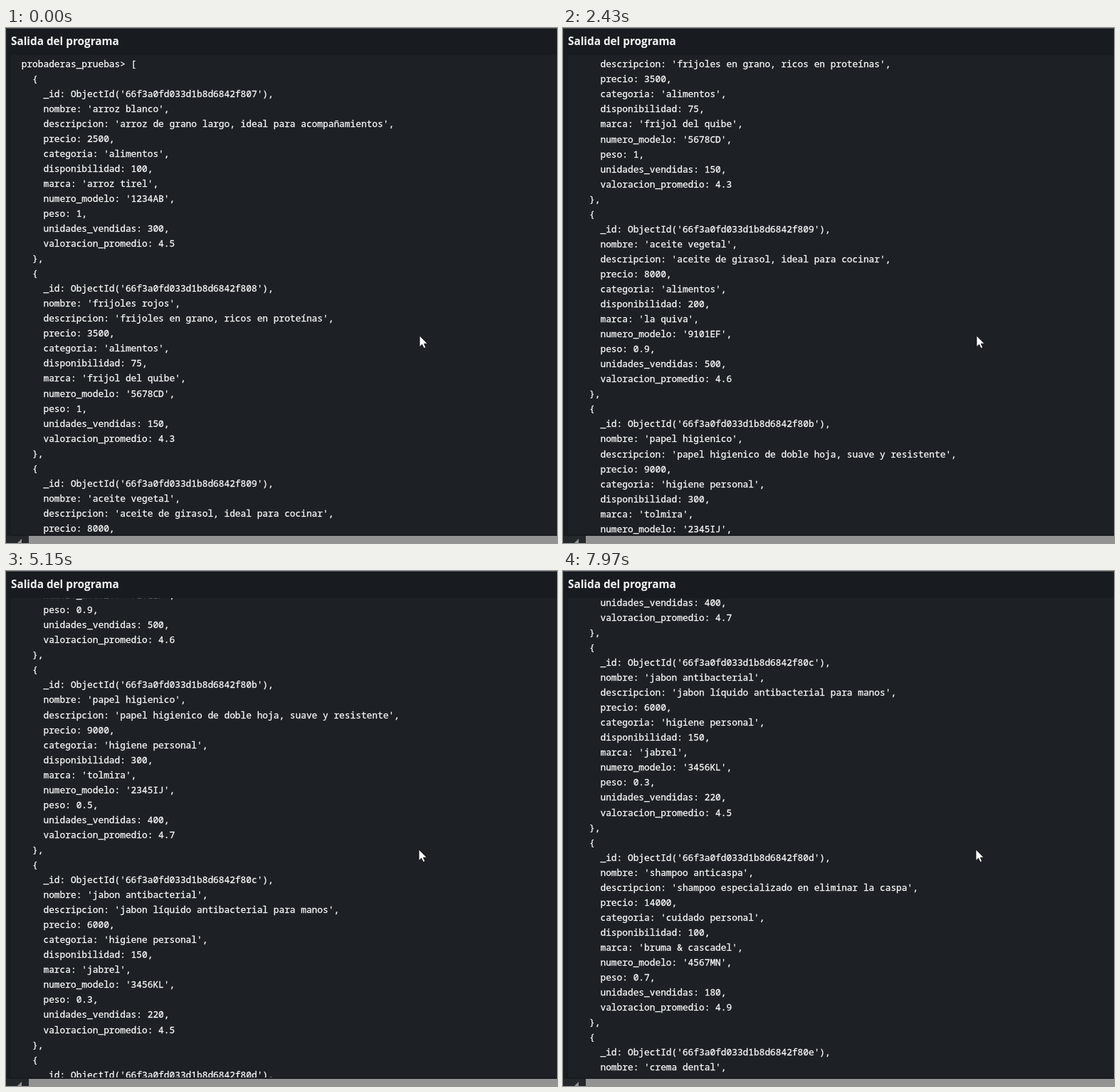
Recreate the animation shown at these times as an HTML page. Size 774x723 px, loop 8 s.

```html
<!DOCTYPE html>
<html lang="es">
<head>
<meta charset="utf-8">
<title>Salida del programa</title>
<style>
  html, body { margin: 0; width: 100%; height: 100%; overflow: hidden; background: #181c20; }
  #stage { position: relative; width: 774px; height: 723px; overflow: hidden; }
  #stage::before { content: ""; position: absolute; inset: 0; border-top: 1px solid #4a4e51; border-left: 1px solid #25292d; }
  h1 { position: absolute; left: 7px; top: 7px; margin: 0; color: #f4f4f4; white-space: nowrap;
       font: 700 15.3px/23px "Open Sans", "Noto Sans", sans-serif; }
  #view { position: absolute; left: 7px; top: 38px; width: 767px; height: 673px; overflow: hidden; background: #1d2125; }
  pre { position: absolute; left: 14.7px; top: 1.5px; margin: 0; color: #f8f8f8; -webkit-text-stroke: 0.3px #f8f8f8;
        font: 12.83px/21.05px "Noto Sans Mono", "DejaVu Sans Mono", monospace; font-variant-ligatures: none; }
  svg { position: absolute; left: 0; top: 0; }
</style>
</head>
<body>
<div id="stage">
  <h1>Salida del programa</h1>
  <div id="view"><pre id="out"></pre></div>
  <svg width="774" height="723">
    <rect y="713" width="32" height="10" fill="#25282b"/>
    <rect x="32" y="713" width="742" height="10" fill="#939393"/>
    <path d="M22 717V723H16Z" fill="#939393"/>
    <path id="cursor" d="M0 0V15.5L3.6 12.2L6 17.6L8.6 16.5L6.2 11.2H11Z" fill="#fff" stroke="#101214" stroke-width=".8"/>
  </svg>
</div>
<script>
const LOOP = 8000, STEP = 134, SLACK = 35;

const keys = ['nombre', 'descripcion', 'precio', 'categoria', 'disponibilidad', 'marca',
  'numero_modelo', 'peso', 'unidades_vendidas', 'valoracion_promedio'];
const items = {
  7: "'arroz blanco'|'arroz de grano largo, ideal para acompañamientos'|2500|'alimentos'|100|'arroz tirel'|'1234AB'|1|300|4.5",
  8: "'frijoles rojos'|'frijoles en grano, ricos en proteínas'|3500|'alimentos'|75|'frijol del quibe'|'5678CD'|1|150|4.3",
  9: "'aceite vegetal'|'aceite de girasol, ideal para cocinar'|8000|'alimentos'|200|'la quiva'|'9101EF'|0.9|500|4.6",
  b: "'papel higienico'|'papel higienico de doble hoja, suave y resistente'|9000|'higiene personal'|300|'tolmira'|'2345IJ'|0.5|400|4.7",
  c: "'jabon antibacterial'|'jabon líquido antibacterial para manos'|6000|'higiene personal'|150|'jabrel'|'3456KL'|0.3|220|4.5",
  d: "'shampoo anticaspa'|'shampoo especializado en eliminar la caspa'|14000|'cuidado personal'|100|'bruma & cascadel'|'4567MN'|0.7|180|4.9",
  e: "'crema dental'|"
};

function format([id, text]) {
  const fields = text.split('|').map((value, i) => `${keys[i]}: ${value}`);
  return ['  {', [`_id: ObjectId('66f3a0fd033d1b8d6842f80${id}')`, ...fields]
    .map(f => '    ' + f).join(',\n'), '  },'].join('\n');
}

// Wheel bursts: first visible step, start and length of the glide, distance
const bursts = [
  { first: 540, start: 412, span: 1993, dist: 357 },
  { first: 3150, start: 2850, span: 3064, dist: 440 },
  { first: 6790, start: 6500, span: 1605, dist: 262 }
];

const clamp = u => Math.max(0, Math.min(1, u));
const smooth = u => u * u * (3 - 2 * u);
const glide = u => u * u * u * (u * (6 * u - 15) + 10);

// The screen repaints once per STEP, counted from the first step of a burst
const snap = (t, first) => t < first ? 0 : first + Math.floor((t - first + SLACK) / STEP) * STEP;

const scrollAt = t => bursts.reduce((sum, b) =>
  sum + b.dist * glide(clamp((snap(t, b.first) - b.start) / b.span)), 0);

const out = document.getElementById('out');
const cursor = document.getElementById('cursor');
out.textContent = 'probaderas_pruebas> [\n' + Object.entries(items).map(format).join('\n');

function draw(t) {
  out.style.transform = `translateY(${-Math.round(scrollAt(t))}px)`;
  const move = smooth(clamp((snap(t, bursts[1].first) - 3020) / 380));
  cursor.setAttribute('transform', `translate(${581 - move} ${Math.round(432 - 41 * move)})`);
}

const began = performance.now();
function frame() {
  draw((performance.now() - began) % LOOP);
  requestAnimationFrame(frame);
}
frame();
</script>
</body>
</html>
```
